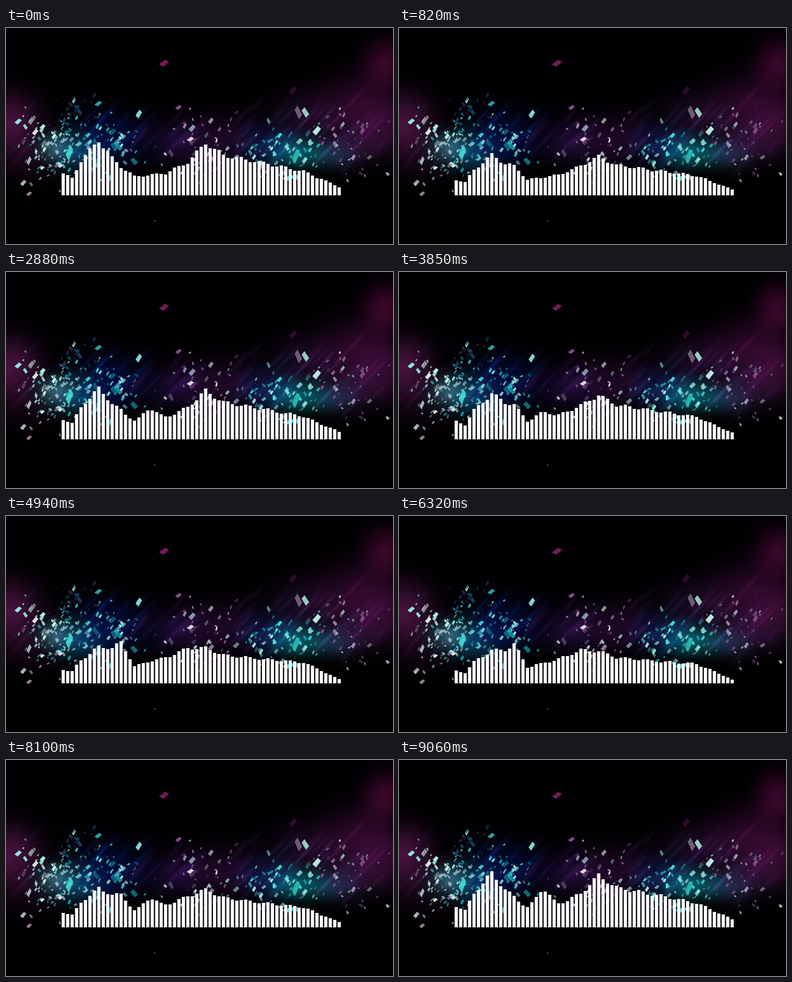
An HTML page with a canvas that plays this animation: 720x404 px, repeating every 9190 ms.

```html
<!DOCTYPE html>
<html>
<head>
<meta charset="utf-8">
<style>
html, body { margin: 0; width: 100%; height: 100%; overflow: hidden; background: #000; }
canvas { display: block; width: 720px; height: 404px; }
</style>
</head>
<body>
<canvas id="stage" width="720" height="404"></canvas>
<script>
const W = 720, H = 404, LOOP = 9190, STEP = 137.3, STEPS = 67;
const BARS = 63, BASE = 313;
const ctx = document.getElementById('stage').getContext('2d');
const scene = document.createElement('canvas');
scene.width = W;
scene.height = H;
const g = scene.getContext('2d');

let seed = 29;
const rnd = () => (seed = (seed * 16807) % 2147483647) / 2147483647;
const gauss = () => (rnd() + rnd() + rnd() - 1.5) * 1.4;
const pick = list => list[Math.floor(rnd() * list.length)];
const mix = (a, b, u) => a + (b - a) * u;

function glow(x, y, rx, ry, rgb, alpha, tilt = 0) {
  g.save();
  g.translate(x, y);
  g.rotate(tilt);
  g.scale(rx, ry);
  const fill = g.createRadialGradient(0, 0, 0, 0, 0, 1);
  [1, .8, .45, .14, 0].forEach((k, i) => fill.addColorStop(i / 4, `rgba(${rgb},${alpha * k})`));
  g.fillStyle = fill;
  g.fillRect(-1, -1, 2, 2);
  g.restore();
}

function streaks(n, cx, cy, sx, sy, rgb, alpha) {
  for (let i = 0; i < n; i++)
    glow(cx + gauss() * sx, cy + gauss() * sy, 25 + rnd() * 40, 3 + rnd() * 6,
      rgb, alpha * (.4 + rnd() * .6), -.82);
}

// A slanted four-cornered flake inside a w by h box.
function flake(x, y, w, h, color, alpha = .92, flip = 1) {
  g.globalAlpha = alpha;
  g.fillStyle = color;
  g.beginPath();
  for (const [u, v] of [[-.5, .15], [.12, -.5], [.5, -.18], [-.08, .5]])
    g.lineTo(x + u * w * flip, y + v * h);
  g.fill();
  g.globalAlpha = 1;
}

function swarm(n, cx, cy, sx, sy, colors) {
  for (let i = 0; i < n; i++) {
    const size = 4 + rnd() * rnd() * 9;
    flake(cx + gauss() * sx, cy + gauss() * sy, size * (.7 + rnd() * .7), size * (.8 + rnd() * .8),
      pick(colors), .35 + rnd() * .65, rnd() < .3 ? -1 : 1);
  }
}

function paintScene() {
  g.fillStyle = '#010002';
  g.fillRect(0, 0, W, H);
  g.globalCompositeOperation = 'lighter';

  // purple haze
  glow(5, 180, 95, 95, '84,22,72', .85);
  glow(40, 270, 90, 70, '38,8,34', .5);
  glow(705, 65, 65, 70, '74,8,52', .75);
  glow(665, 145, 130, 95, '66,12,58', .7);
  glow(705, 195, 90, 80, '56,14,50', .6);
  glow(560, 165, 110, 75, '48,16,58', .5);
  glow(395, 210, 130, 75, '44,12,54', .65);
  glow(310, 215, 90, 70, '26,12,56', .6);
  glow(640, 225, 90, 65, '50,24,66', .6);

  // blue and teal cores
  glow(190, 210, 105, 85, '2,14,70', .85);
  glow(112, 228, 85, 62, '18,82,96', .75);
  glow(92, 222, 42, 38, '62,84,96', .5);
  glow(150, 255, 80, 42, '0,44,76', .5);
  glow(490, 220, 90, 65, '8,24,74', .7);
  glow(540, 235, 80, 52, '0,104,104', .8);
  glow(605, 240, 70, 45, '16,62,82', .6);

  streaks(18, 190, 200, 85, 45, '8,26,84', .35);
  streaks(18, 370, 205, 100, 36, '64,24,84', .3);
  streaks(22, 535, 215, 85, 42, '36,56,104', .3);
  streaks(18, 625, 190, 70, 50, '74,24,78', .25);
  streaks(8, 50, 240, 50, 40, '60,24,62', .25);
  g.globalCompositeOperation = 'source-over';

  // floor shadow
  const shade = g.createLinearGradient(0, 235, 0, 345);
  shade.addColorStop(0, 'rgba(0,0,0,0)');
  shade.addColorStop(.4, 'rgba(0,0,0,.5)');
  shade.addColorStop(.72, 'rgba(0,0,0,.94)');
  shade.addColorStop(1, '#000');
  g.fillStyle = shade;
  g.fillRect(0, 235, W, H - 235);

  const mint = ['#8fe9e0', '#3fdcd8', '#b9f3ec', '#16a4aa'];
  const pale = ['#c8d2dc', '#a9c8cf', '#e6f4f2', '#7e7298'];
  const plum = ['#8b4d91', '#b096b8', '#572052', '#8c9cac'];
  swarm(105, 125, 218, 65, 42, mint);
  swarm(50, 65, 228, 32, 42, pale);
  swarm(40, 205, 218, 48, 40, mint);
  swarm(24, 125, 165, 55, 36, ['#0d5f78', '#16405f', '#31204f']);
  swarm(60, 365, 225, 50, 48, [...plum, ...pale]);
  swarm(85, 525, 232, 54, 32, mint);
  swarm(50, 630, 210, 48, 52, [...plum, ...pale]);

  // the few flakes that stand out
  flake(294, 66, 19, 13, '#7a1f5c');
  flake(544, 158, 14, 26, '#75657f', .9, -1);
  flake(557, 158, 14, 20, '#a5e0d2', .9, -1);
  flake(578, 192, 16, 18, '#c6f7ef');
  flake(247, 161, 12, 17, '#8ee8dc');
  flake(118, 233, 14, 31, '#3fd6cf');
  flake(539, 240, 14, 29, '#23b9b4');
  flake(527, 280, 29, 10, '#25e0e0');
  flake(343, 208, 14, 9, '#e4dfe8');
  flake(534, 117, 14, 17, '#330c32');
  flake(43, 310, 11, 9, '#a486a2');
  flake(276.5, 361, 2, 3, '#b8b8b8');
}

// Two spectra as bar heights at a few knots; every pose blends them.
const knots = [0, 2, 4, 8, 11, 13, 16, 23, 28, 32, 36, 46, 54, 62];
const soft = [24, 21, 41, 64, 64, 76, 31, 47, 64, 62, 50, 42, 38, 7];
const loud = [41, 32, 65, 103, 70, 54, 35, 41, 62, 98, 75, 59, 45, 16];
const poses = [
  { at: 0, blend: 1, gain: 1, pluck: 0 },
  { at: 12, blend: 0, gain: .7, pluck: 0 },
  { at: 21, blend: 1, gain: 1, pluck: 22 },
  { at: 36, blend: 0, gain: 1.03, pluck: 0 },
  { at: 46, blend: 0, gain: .97, pluck: 0 },
  { at: 59, blend: .4, gain: .92, pluck: 18 },
  { at: 66, blend: 1, gain: 1.04, pluck: 33 },
  { at: STEPS, blend: 1, gain: 1, pluck: 0 }
];

function sample(spectrum, bar) {
  const k = Math.max(1, knots.findIndex(n => n >= bar));
  return mix(spectrum[k - 1], spectrum[k], (bar - knots[k - 1]) / (knots[k] - knots[k - 1]));
}

function draw(now) {
  const step = Math.min(STEPS - 1, Math.floor((now % LOOP) / STEP));
  const next = poses.findIndex(p => p.at > step);
  const a = poses[next - 1], b = poses[next];
  const u = (step - a.at) / (b.at - a.at);
  const [blend, gain, pluck] = ['blend', 'gain', 'pluck'].map(name => mix(a[name], b[name], u));
  ctx.drawImage(scene, 0, 0);
  ctx.fillStyle = '#fcfaff';
  for (let i = 0; i < BARS; i++) {
    const ripple = 1 + .05 * Math.sin(step * 2.1 + i * 1.3);
    const bump = pluck * Math.exp(-(((i - 19.5) / 2.2) ** 2));
    const h = Math.round(mix(sample(soft, i), sample(loud, i), blend) * gain * ripple + bump);
    ctx.fillRect(103.5 + i * 8.28, BASE - h, 6, h);
  }
}

paintScene();
const start = performance.now();
function tick() {
  draw(performance.now() - start);
  requestAnimationFrame(tick);
}
tick();
</script>
</body>
</html>
```
